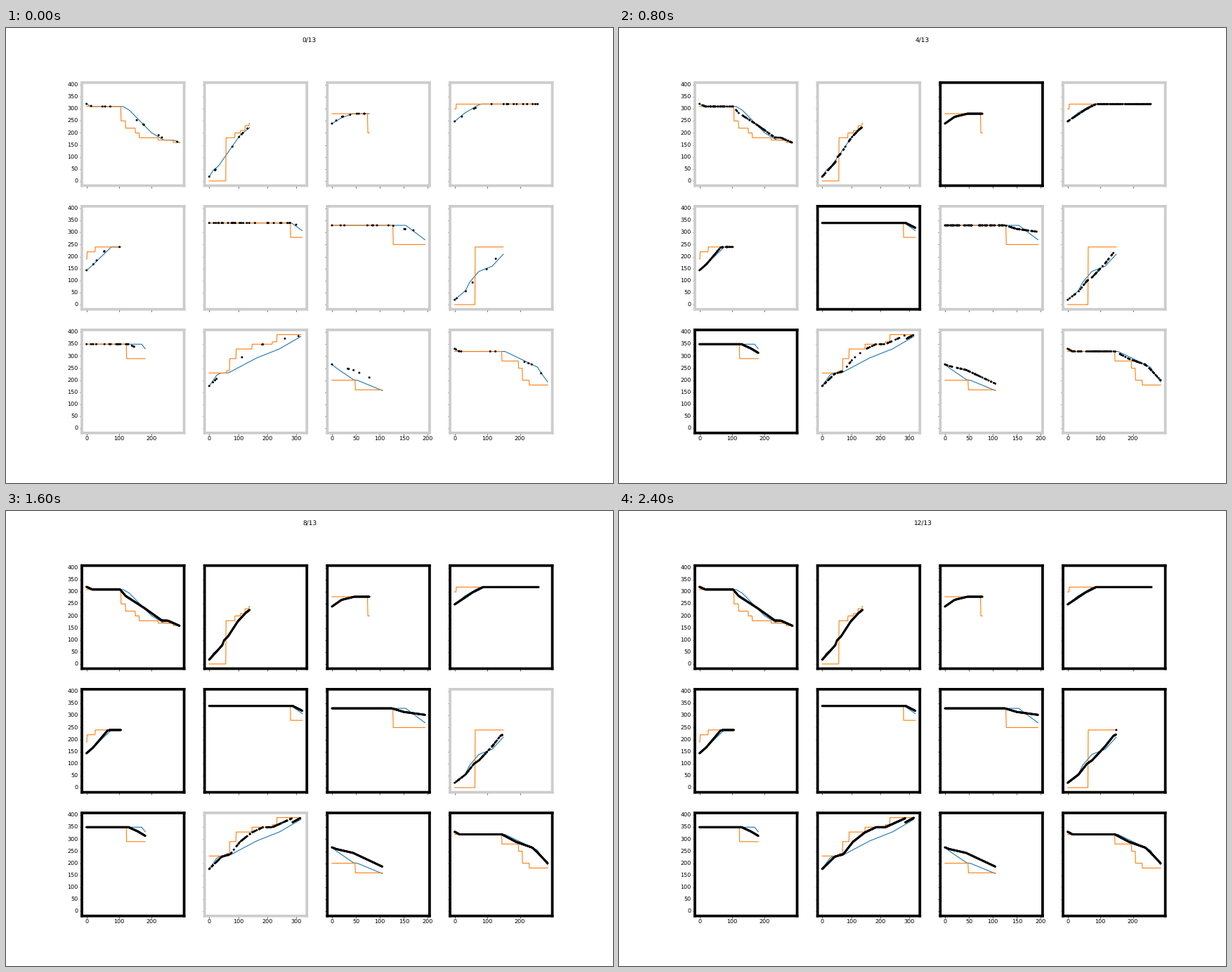
A matplotlib script for the animation above (2.6 s loop, 864x648 px).

```python
import numpy as np
import matplotlib.pyplot as plt
from matplotlib.animation import FuncAnimation

FRAMES = 13
DOT_AREA = 16

# Sub-pixel placement keeps thin lines and small text smooth at this low dpi.
plt.rcParams.update({'path.snap': False, 'text.hinting': 'none',
                     'text.hinting_factor': 1})
fig, axes = plt.subplots(3, 4, sharex='col', sharey=True,
                         figsize=(16, 12), dpi=54)
title = fig.suptitle('')
panels = []


def curve(xs, points):
    return np.interp(xs, *zip(*points))


def stairs(xs, steps):
    starts, levels = map(np.array, zip(*steps))
    return levels[np.searchsorted(starts, xs, side='right') - 1]


def reveal_frames(count, done, seed):
    """Samples appear in random order at a steady rate, the rest at `done`."""
    rank = np.random.default_rng(seed).permutation(count)
    rank[0] = 0
    when = np.ceil((rank / count * done - 0.27) / 0.5)
    return np.clip(when, 0, done)


def panel(row, col, done, steps, actual, sampled):
    ax = axes[row, col]
    xs = np.arange(actual[-1][0] + 1)
    ax.plot(xs, curve(xs, actual))
    ax.plot(xs, stairs(xs, steps))
    dots = ax.scatter(xs, curve(xs, sampled), s=np.full(len(xs), DOT_AREA),
                      color='black', linewidths=0, zorder=2.2)
    for spine in ax.spines.values():
        spine.set_linewidth(5)
    when = reveal_frames(len(xs), done, seed=4 * row + col)
    panels.append((ax, dots, when, done))


panel(0, 0, done=8,
      steps=[(0, 310), (106, 250), (120, 220), (150, 200), (162, 180),
             (220, 170), (266, 160)],
      actual=[(0, 322), (12, 310), (112, 310), (131, 295), (199, 201),
              (236, 171), (270, 169), (285, 160)],
      sampled=[(0, 321), (18, 310), (103, 310), (120, 283), (177, 233),
               (231, 181), (250, 180), (285, 159)])

panel(0, 1, done=6,
      steps=[(0, 0), (58, 180), (89, 200), (108, 210), (124, 230), (138, 240)],
      actual=[(0, 18), (14, 45), (33, 64), (106, 190), (139, 222)],
      sampled=[(0, 18), (45, 78), (51, 98), (65, 115), (99, 178), (127, 214),
               (139, 225)])

panel(0, 2, done=3,
      steps=[(0, 280), (75, 200)],
      actual=[(0, 239), (20, 263), (43, 280), (78, 280)],
      sampled=[(0, 239), (20, 267), (47, 280), (78, 280)])

panel(0, 3, done=5,
      steps=[(0, 300), (5, 320)],
      actual=[(0, 248), (31, 283), (74, 317), (82, 320), (257, 320)],
      sampled=[(0, 248), (55, 298), (87, 320), (257, 320)])

panel(1, 0, done=5,
      steps=[(0, 190), (2, 220), (27, 240)],
      actual=[(0, 143), (12, 156), (76, 240), (105, 240)],
      sampled=[(0, 143), (21, 168), (64, 237), (72, 240), (105, 240)])

panel(1, 1, done=3,
      steps=[(0, 340), (281, 280)],
      actual=[(0, 340), (284, 340), (321, 308)],
      sampled=[(0, 340), (288, 340), (321, 320)])

panel(1, 2, done=5,
      steps=[(0, 330), (128, 250)],
      actual=[(0, 330), (154, 330), (194, 270)],
      sampled=[(0, 330), (125, 330), (150, 315), (194, 303)])

panel(1, 3, done=9,
      steps=[(0, 0), (63, 240)],
      actual=[(0, 20), (33, 58), (46, 93), (74, 138), (115, 160), (149, 210)],
      sampled=[(0, 20), (33, 54), (59, 99), (75, 114), (115, 172), (140, 215),
               (148, 221), (149, 240)])

panel(2, 0, done=3,
      steps=[(0, 350), (123, 290)],
      actual=[(0, 350), (169, 350), (180, 331)],
      sampled=[(0, 350), (129, 350), (158, 332), (180, 314)])

panel(2, 1, done=12,
      steps=[(0, 230), (60, 240), (71, 290), (93, 330), (148, 350),
             (218, 360), (234, 390)],
      actual=[(0, 176), (26, 221), (38, 229), (67, 231), (162, 292),
              (242, 330), (316, 382)],
      sampled=[(0, 176), (43, 227), (73, 238), (106, 289), (147, 328),
               (186, 350), (218, 350), (286, 387), (287, 370), (316, 389)])

panel(2, 2, done=7,
      steps=[(0, 200), (49, 160)],
      actual=[(0, 266), (9, 251), (45, 202), (54, 199), (105, 157)],
      sampled=[(0, 266), (9, 259), (44, 243), (105, 186)])

panel(2, 3, done=8,
      steps=[(0, 320), (145, 280), (196, 250), (208, 200), (229, 180)],
      actual=[(0, 331), (13, 320), (154, 320), (188, 298), (254, 254),
              (263, 234), (285, 193)],
      sampled=[(0, 331), (15, 320), (145, 320), (188, 289), (238, 265),
               (253, 246), (285, 200)])


def update(frame):
    title.set_text(f'{frame}/{FRAMES}')
    for ax, dots, when, done in panels:
        dots.set_sizes(np.where(when <= frame, DOT_AREA, 0))
        for spine in ax.spines.values():
            spine.set_color('black' if frame >= done else '0.8')
    return []


anim = FuncAnimation(fig, update, frames=FRAMES, interval=200,
                     init_func=lambda: update(0), repeat=True, repeat_delay=0)
plt.show()
```
